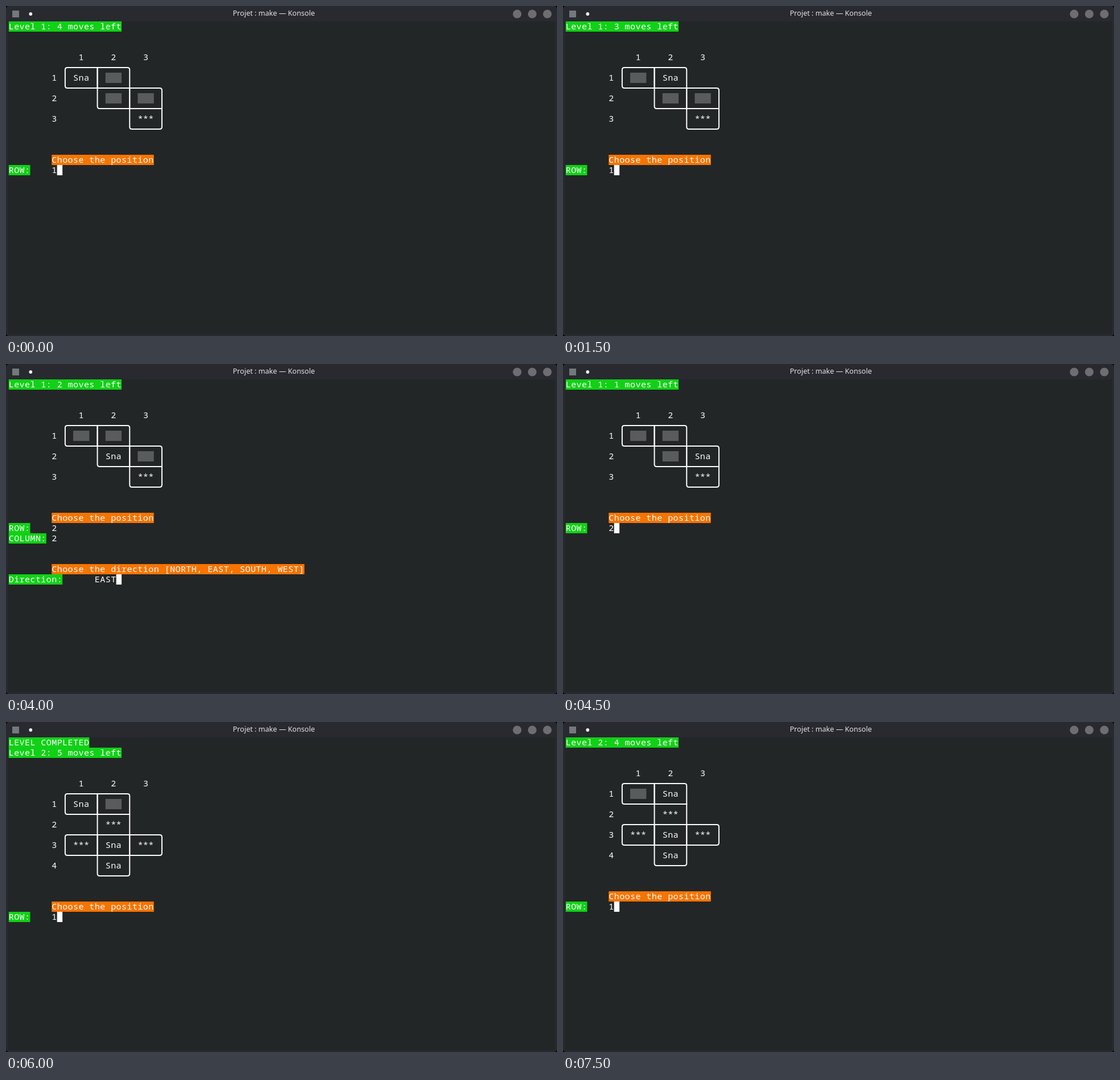
Write an HTML page that moves like this. It is 968 px wide and 579 px high and loops after 8 s.

```html
<!DOCTYPE html>
<html lang="en">
<head>
<meta charset="utf-8">
<title>Terminal game</title>
<style>
  html, body { margin: 0; width: 100%; height: 100%; overflow: hidden; background: #000; }
  svg { display: block; }
  .title { font: 12.6px "Noto Sans", sans-serif; fill: #e3e4e6; text-anchor: middle; }
  #screen text {
    font: 15.115px "Noto Sans Mono", monospace;
    letter-spacing: .378px;
    fill: #fcfcfc;
    white-space: pre;
  }
  #screen path { fill: none; stroke: #fcfcfc; stroke-width: 2; }
</style>
</head>
<body>
<svg width="968" height="579" viewBox="0 0 968 579">
  <rect width="968" height="579" rx="5" fill="#292930"/>
  <rect x="3" y="27" width="962" height="549" fill="#232627"/>
  <rect x="11" y="8" width="12" height="12" fill="#73797d"/>
  <circle cx="43.3" cy="14" r="2.9" fill="#eceded"/>
  <text class="title" x="470.5" y="17.3">Projet : make — Konsole</text>
  <g fill="#6e6d72">
    <circle cx="898" cy="14" r="7.6"/>
    <circle cx="924.5" cy="14" r="7.6"/>
    <circle cx="951" cy="14" r="7.6"/>
  </g>
  <g id="screen"></g>
</svg>
<script>
const STEP = 500, LOOP = 8000;
const CELL_W = 9.447, CELL_H = 18, LEFT = 4.7, TOP = 27, BASELINE = 14.2;
const GREEN = '#11d116', ORANGE = '#f67400', WHITE = '#fcfcfc', GREY = '#5a5b5c';

// Board cells: S = piece, # = empty square, * = goal, . = nothing
const turns = [
  { level: 1, moves: 4, board: ['S#.', '.##', '..*'], row: 1, col: 1, dir: 'EAST' },
  { level: 1, moves: 3, board: ['#S.', '.##', '..*'], row: 1, col: 2, dir: 'SOUTH' },
  { level: 1, moves: 2, board: ['##.', '.S#', '..*'], row: 2, col: 2, dir: 'EAST' },
  { level: 1, moves: 1, board: ['##.', '.#S', '..*'], row: 2, col: 3, dir: 'SOUTH' },
  { level: 2, moves: 5, board: ['S#.', '.*.', '*S*', '.S.'], row: 1, col: 1, dir: 'EAST', done: true },
  { level: 2, moves: 4, board: ['#S.', '.*.', '*S*', '.S.'], row: 1, col: 2, dir: 'SOUTH' }
];

const px = col => LEFT + col * CELL_W;
const py = row => TOP + row * CELL_H;

const block = (col, row, n, fill) =>
  `<rect x="${px(col)}" y="${py(row)}" width="${n * CELL_W}" height="${CELL_H}" fill="${fill}"/>`;

const print = (col, row, s, fill) =>
  (fill ? block(col, row, s.length, fill) : '') +
  `<text x="${px(col)}" y="${py(row) + BASELINE}">${s}</text>`;

const typed = (col, row, s, active) =>
  print(col, row, s) + (active ? block(col + s.length, row, 1, WHITE) : '');

// Outline of one cell, rounded only at corners no other cell shares
function outline(filled, r, c, top) {
  const x0 = px(10.5 + c * 6), x1 = px(16.5 + c * 6);
  const y0 = py(top + .5 + r * 2), y1 = y0 + 2 * CELL_H;
  const radius = (dr, dc) =>
    filled(r + dr, c) || filled(r, c + dc) || filled(r + dr, c + dc) ? 0 : 4;
  const a = radius(-1, -1), b = radius(-1, 1), d = radius(1, 1), e = radius(1, -1);
  return `<path d="M${x0 + a} ${y0}H${x1 - b}Q${x1} ${y0} ${x1} ${y0 + b}` +
    `V${y1 - d}Q${x1} ${y1} ${x1 - d} ${y1}H${x0 + e}Q${x0} ${y1} ${x0} ${y1 - e}` +
    `V${y0 + a}Q${x0} ${y0} ${x0 + a} ${y0}Z"/>`;
}

function drawBoard(board, top) {
  const filled = (r, c) => '#S*'.includes(board[r]?.[c] ?? '.');
  let out = '';
  for (let c = 0; c < 3; c++) out += print(13 + c * 6, top - 1, `${c + 1}`);
  board.forEach((line, r) => {
    const row = top + 1 + r * 2;
    out += print(8, row, `${r + 1}`);
    [...line].forEach((kind, c) => {
      if (kind === '.') return;
      const col = 12 + c * 6;
      out += outline(filled, r, c, top);
      out += kind === '#' ? block(col, row, 3, GREY) : print(col, row, kind === 'S' ? 'Sna' : '***');
    });
  });
  return out;
}

function drawTurn(turn, phase) {
  const head = turn.done ? 1 : 0;
  const ask = head + 7 + turn.board.length * 2;
  let out = turn.done ? print(0, 0, 'LEVEL COMPLETED', GREEN) : '';
  out += print(0, head, `Level ${turn.level}: ${turn.moves} moves left`, GREEN);
  out += drawBoard(turn.board, head + 4);
  out += print(8, ask, 'Choose the position', ORANGE);
  out += print(0, ask + 1, 'ROW:', GREEN) + typed(8, ask + 1, `${turn.row}`, phase === 0);
  if (phase > 0)
    out += print(0, ask + 2, 'COLUMN:', GREEN) + typed(8, ask + 2, `${turn.col}`, phase === 1);
  if (phase > 1) {
    out += print(8, ask + 5, 'Choose the direction [NORTH, EAST, SOUTH, WEST]', ORANGE);
    out += print(0, ask + 6, 'Direction:', GREEN) + typed(16, ask + 6, turn.dir, true);
  }
  return out;
}

const screen = document.getElementById('screen');
const start = performance.now();
let shown = -1;

function tick() {
  const step = Math.floor((performance.now() - start) % LOOP / STEP);
  if (step !== shown) {
    shown = step;
    screen.innerHTML = drawTurn(turns[Math.floor(step / 3)], step % 3);
  }
  requestAnimationFrame(tick);
}
tick();
</script>
</body>
</html>
```
